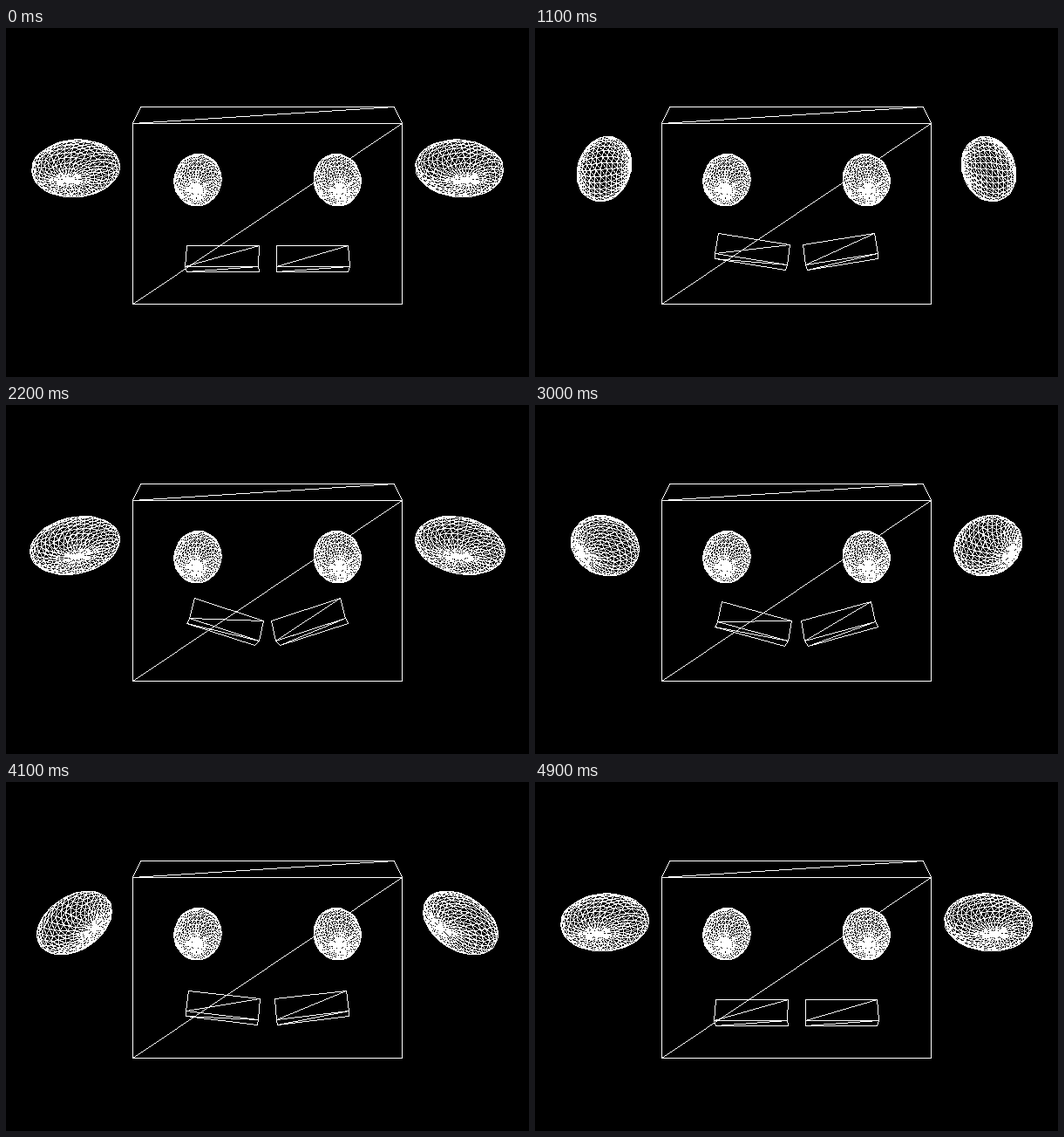
Write an HTML page with a canvas that moves like this. It is 600 px wide and 400 px high and loops after 5000 ms.

```html
<!DOCTYPE html>
<html lang="en">
<head>
<meta charset="utf-8">
<title>Wireframe robot</title>
<style>
html, body { margin: 0; width: 100%; height: 100%; overflow: hidden; background: #000; }
canvas { display: block; }
</style>
</head>
<body>
<canvas id="stage" width="600" height="400"></canvas>
<script>
const W = 600, H = 400;
const ctx = document.getElementById('stage').getContext('2d');
const image = ctx.createImageData(W, H);
const pixels = new Uint32Array(image.data.buffer);
const WHITE = 0xffffffff, BLACK = 0xff000000;

// The camera sits high above the head and looks straight ahead.
const EYE_X = 300, EYE_Y = -218, DIST = 838;
const STEPS = 50, STEP_MS = 100;
const RINGS = 16, SLICES = 32;

function project([x, y, z]) {
  const s = DIST / (DIST - z);
  return [EYE_X + x * s, EYE_Y + y * s];
}

// Hard-edged one pixel line
function line(a, b) {
  let x = Math.floor(a[0]), y = Math.floor(a[1]);
  const x1 = Math.floor(b[0]), y1 = Math.floor(b[1]);
  const dx = Math.abs(x1 - x), dy = -Math.abs(y1 - y);
  const sx = x < x1 ? 1 : -1, sy = y < y1 ? 1 : -1;
  let err = dx + dy;
  for (;;) {
    if (x >= 0 && x < W && y >= 0 && y < H) pixels[y * W + x] = WHITE;
    if (x === x1 && y === y1) return;
    const e2 = 2 * err;
    if (e2 >= dy) { err += dy; x += sx; }
    if (e2 <= dx) { err += dx; y += sy; }
  }
}

// Face made of two triangles, split from bottom left to top right
function quad(tl, tr, br, bl) {
  line(tl, tr);
  line(tr, br);
  line(br, bl);
  line(bl, tl);
  line(bl, tr);
}

function triangle(a, b, c) {
  const area = (b[0] - a[0]) * (c[1] - a[1]) - (b[1] - a[1]) * (c[0] - a[0]);
  if (area <= 0) return;
  line(a, b);
  line(b, c);
  line(c, a);
}

function ellipsoid(cx, cy, rx, r, turn) {
  const cos = Math.cos(turn), sin = Math.sin(turn);
  const point = (i, j) => {
    const p = Math.PI * i / RINGS, q = 2 * Math.PI * j / SLICES;
    const x = rx * Math.sin(p) * Math.cos(q);
    const y = r * Math.sin(p) * Math.sin(q);
    const z = r * Math.cos(p);
    return project([
      cx - EYE_X + x * cos - z * sin,
      cy - EYE_Y + y,
      x * sin + z * cos
    ]);
  };
  const grid = [];
  for (let i = 0; i <= RINGS; i++) {
    grid.push(Array.from({ length: SLICES + 1 }, (_, j) => point(i, j)));
  }
  for (let i = 0; i < RINGS; i++) {
    for (let j = 0; j < SLICES; j++) {
      const a = grid[i][j], c = grid[i + 1][j + 1];
      triangle(a, grid[i + 1][j], c);
      triangle(a, c, grid[i][j + 1]);
    }
  }
}

function head() {
  const tl = [145, 109], tr = [454, 109];
  quad([154, 90], [445, 90], tr, tl);
  quad(tl, tr, [454, 316], [145, 316]);
}

// Square bar standing on its edge, rolled about the middle of the mouth
function lip(left, right, roll) {
  const cos = Math.cos(roll), sin = Math.sin(roll), half = 15;
  const corner = (x, y, z) =>
    project([x * cos - y * sin, 264.5 - EYE_Y + x * sin + y * cos, z]);
  const edge = (y, z) => [corner(left, y, z), corner(right, y, z)];
  const [tl, tr] = edge(-half, 0);
  const [ml, mr] = edge(0, half);
  const [bl, br] = edge(half, 0);
  quad(tl, tr, mr, ml);
  quad(ml, mr, br, bl);
}

function draw(step) {
  const u = step / (STEPS - 1);
  const turn = 2 * Math.PI * u;
  const roll = (1 - Math.abs(2 * u - 1)) * Math.PI / 9;
  pixels.fill(BLACK);
  head();
  for (const side of [-1, 1]) {
    ellipsoid(300 + 80 * side, 173.8, 27, 27, 0);
    ellipsoid(300 + 220 * side, 160.4, 50, 30, -side * turn);
  }
  lip(-92.5, -10, roll);
  lip(10, 92.5, -roll);
  ctx.putImageData(image, 0, 0);
}

const start = performance.now();
function tick() {
  const t = performance.now() - start;
  draw(Math.floor(t / STEP_MS) % STEPS);
  requestAnimationFrame(tick);
}
tick();
</script>
</body>
</html>
```
